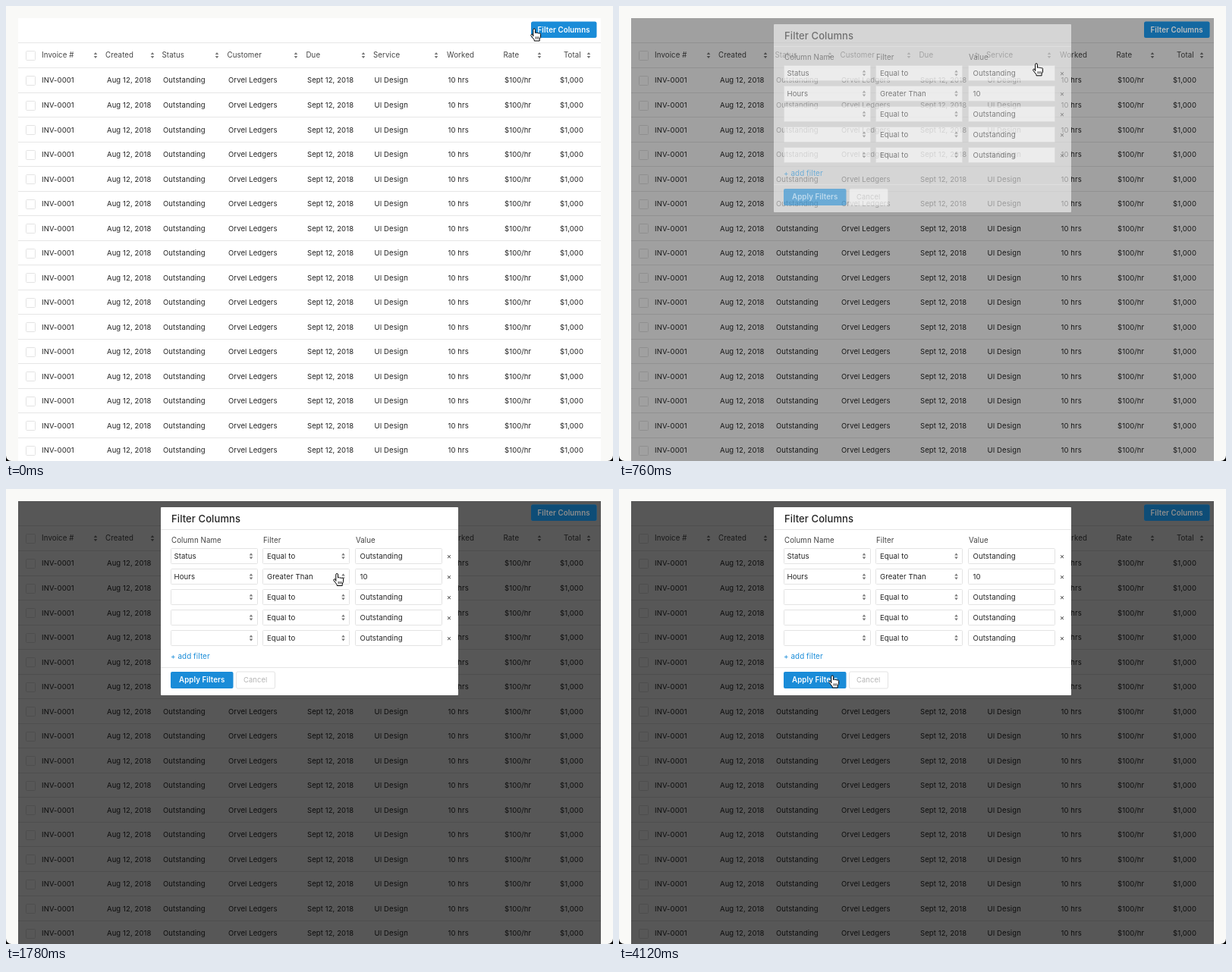
These frames come from a looping animation (800x600 px, 4140 ms). An HTML page:

```html
<!DOCTYPE html>
<html lang="en">
<head>
<meta charset="utf-8">
<title>Filter columns</title>
<style>
  html, body { margin: 0; width: 100%; height: 100%; overflow: hidden; background: #000; }
  svg { display: block; width: 800px; height: 600px; }
  text { font: 9.6px Inter, "Open Sans", sans-serif; letter-spacing: .1px; fill: #222; white-space: pre; }
  .head { fill: #444; font-size: 9.7px; }
  .cell { font-size: 9.5px; }
  .title { font-size: 13px; font-weight: 500; }
  .strong { font-weight: 600; font-size: 9.7px; fill: #fff; }
  .link { fill: #1a8cd8; font-size: 9.8px; }
  .soft { fill: #b4b4b4; font-size: 9.4px; }
  .item { fill: #555; }
  .panel { fill: #fff; }
  .box { fill: #fff; stroke: #e3e3e3; }
  .line { stroke: #e6e6e6; }
  .blue { fill: #1a8cd8; }
  .arrows { fill: #777; }
  /* every part fades by itself, so stacked parts look denser midway */
  .fade * { opacity: var(--shown); }
</style>
</head>
<body>
<svg viewBox="0 0 800 600">
  <path d="M0 0H800V593a7 7 0 0 1-7 7H7a7 7 0 0 1-7-7z" fill="#f9f9f7"/>
  <rect x="16" y="16" width="768" height="584" fill="#fff"/>
  <g id="table"></g>
  <rect id="shade" x="16" y="16" width="768" height="584"/>
  <g id="button"></g>
  <rect id="buttonShade" x="692" y="20.5" width="86.5" height="21.5" rx="2.5"/>
  <g id="modal" class="fade"></g>
  <g id="menu" class="fade"></g>
  <g id="cursor" stroke="#000" stroke-linejoin="round">
    <path fill="#fff" d="M-3.2 1.8V-6.6a1.4 1.4 0 0 1 2.8 0V-2.4a1.4 1.2 0 0 1 2.4 .3 1.4 1.2 0 0 1 2.4 .5 1.2 1.2 0 0 1 2.2 .9V3.2L5.2 5.6V8H-1.8V6.6L-6 1.2a1.3 1.3 0 0 1 2-1.6z"/>
    <path fill="none" stroke-width=".8" d="M.2 2.4v3.2m2-3.2v3.2m2-3.2v3.2"/>
  </g>
</svg>
<script>
const $ = id => document.getElementById(id);

// Markup helpers; y is the vertical centre of the text or box
const text = (x, y, s, cls = '', size = 9.6) =>
  `<text x="${x}" y="${y + size * .36}" class="${cls}">${s}</text>`;
const rect = (x, y, w, h, cls, r = 1) =>
  `<rect x="${x}" y="${y - h / 2}" width="${w}" height="${h}" rx="${r}" class="${cls}"/>`;
const line = (x1, x2, y) => `<path d="M${x1} ${y}H${x2}" class="line"/>`;
const arrows = (x, y) =>
  `<path class="arrows" d="M${x - 2.3} ${y - .9}h4.6l-2.3-3zM${x - 2.3} ${y + .9}h4.6l-2.3 3z"/>`;

function drawTable() {
  // heading, heading x, cell, cell x, sort arrows x
  const columns = [
    ['Invoice #', 47, 'INV-0001', 47, 118],
    ['Created', 131, 'Aug 12, 2018', 133, 193],
    ['Status', 205.5, 'Outstanding', 207, 278],
    ['Customer', 291.5, 'Orvel Ledgers', 293, 382],
    ['Due', 395.5, 'Sept 12, 2018', 397, 471],
    ['Service', 484, 'UI Design', 485.5, 567],
    ['Worked', 581, '10 hrs', 582.5, 0],
    ['Rate', 655.5, '$100/hr', 657, 703],
    ['Total', 735, '$1,000', 730, 768]
  ];
  const check = y => rect(26.5, y, 12, 12, 'box');
  let out = line(16, 784, 48.5) + check(65.5);
  for (const [name, x, , , sortX] of columns)
    out += text(x, 65, name, 'head') + (sortX ? arrows(sortX, 65) : '');
  for (let i = 0; i < 16; i++) {
    const y = 98 + i * 32.53;
    out += line(16, 784, Math.round(y - 17) + .5) + check(Math.round(y) + .5);
    for (const [, , cell, x] of columns) out += text(x, y, cell, 'cell');
  }
  return out;
}

function drawModal() {
  let out = rect(204, 148, 392, 248, 'panel') +
    text(218, 39, 'Filter Columns', 'title', 13) + line(204, 596, 53.5) +
    text(218, 68, 'Column Name', 'head') + text(339, 68, 'Filter', 'head') +
    text(461, 68, 'Value', 'head');
  const filters = [['Status', 'Equal to', 'Outstanding'], ['Hours', 'Greater Than', '10']];
  for (let i = 0; i < 5; i++) {
    const y = 88.5 + Math.round(i * 27.1);
    const [name, test, value] = filters[i] || ['', 'Equal to', 'Outstanding'];
    out += [217.5, 338.5, 460.5].map(x => rect(x, y, 114, 20, 'box')).join('') +
      text(221.5, y, name) + arrows(323, y) +
      text(344, y, test) + arrows(444.5, y) +
      text(466.5, y, value) + text(580.8, y, '×', 'head');
  }
  return out + text(217, 221, '+ add filter', 'link') + line(204, 596, 235.5) +
    rect(217, 252, 82.5, 22, 'blue', 2) + text(228, 252, 'Apply Filters', 'strong') +
    rect(303.5, 252, 51, 22, 'box', 2) + text(313, 252, 'Cancel', 'soft');
}

function drawMenu() {
  const items = ['Equal to', 'Contains', 'Begins with', 'In between',
    'Not equal to', 'Greater than', 'Less than'];
  return rect(338.5, 198.5, 114, 144, 'box') +
    items.map((s, i) => text(344, 143.8 + i * 19.2, s, 'item')).join('');
}

$('table').innerHTML = drawTable();
$('button').innerHTML = rect(692, 31.25, 86.5, 21.5, 'blue', 2.5) +
  text(700.5, 31.3, 'Filter Columns', 'strong');
$('modal').innerHTML = drawModal();
$('menu').innerHTML = drawMenu();

// cubic-bezier(.25, .1, .25, 1)
function ease(x) {
  if (x <= 0) return 0;
  if (x >= 1) return 1;
  const curve = (a, b, u) => 3 * a * u * (1 - u) ** 2 + 3 * b * u * u * (1 - u) + u ** 3;
  let lo = 0, hi = 1;
  for (let i = 0; i < 24; i++) {
    const mid = (lo + hi) / 2;
    if (curve(.25, .25, mid) < x) lo = mid; else hi = mid;
  }
  return curve(.1, 1, lo);
}

const LOOP = 4140, STEP = 350;
const stops = [[698, 38], [438, 119.5], [430, 242], [283, 254]];

function render(t) {
  const phase = start => ease((t - start) / STEP);
  const open = phase(647), drop = phase(1825), pick = phase(2195), close = phase(2960);
  const moves = [open, pick, close];
  const [x, y] = [0, 1].map(k =>
    moves.reduce((p, m, i) => p + m * (stops[i + 1][k] - stops[i][k]), stops[0][k]));
  $('shade').setAttribute('opacity', .66 * open);
  $('buttonShade').setAttribute('opacity', .45 * open);
  $('modal').style.setProperty('--shown', open);
  $('menu').style.setProperty('--shown', drop * (1 - close));
  $('cursor').setAttribute('transform', `translate(${x} ${y})`);
}

const began = performance.now();
(function tick() {
  render((performance.now() - began) % LOOP);
  requestAnimationFrame(tick);
})();
</script>
</body>
</html>
```
